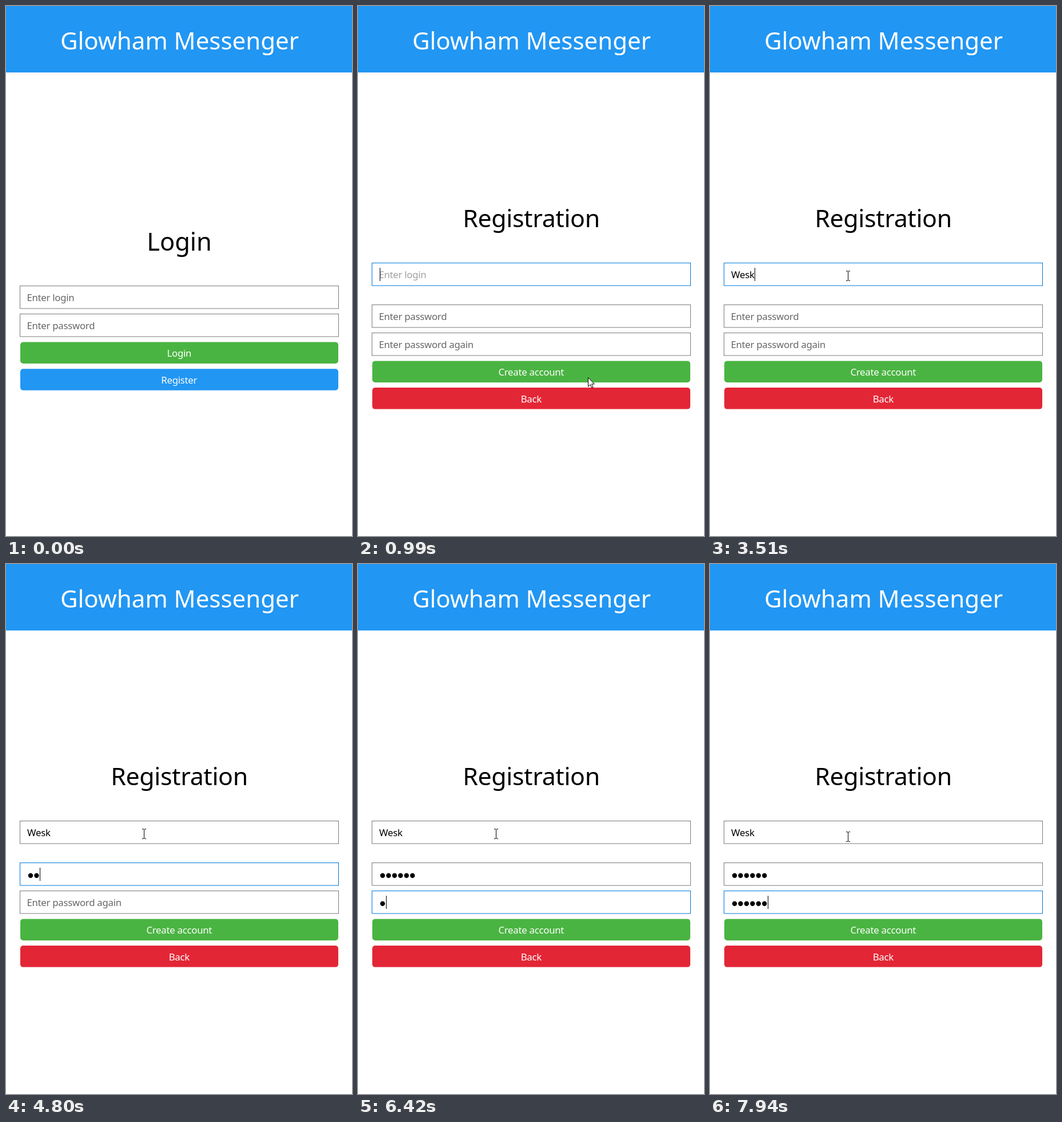
An HTML page for the animation above (8000 ms loop, 605 by 925 pixels).

```html
<!DOCTYPE html>
<html lang="en">
<head>
<meta charset="utf-8">
<title>Registration form</title>
<style>
html, body { margin: 0; width: 100%; height: 100%; overflow: hidden; background: #fff; }
svg { display: block; width: 605px; height: 925px; font-family: "Noto Sans", "Open Sans", sans-serif; }
text { font-size: 16.8px; letter-spacing: -.27px; }
.title { font-size: 42px; letter-spacing: 0; fill: #fff; text-anchor: middle; }
.head { font-size: 43.4px; letter-spacing: 0; text-anchor: middle; }
.head.long { font-size: 42.8px; letter-spacing: -.35px; }
.field rect { fill: #fff; stroke: #7a7a7a; }
.field .hint { fill: #666; }
.field.focus rect { stroke: #0078d7; }
.field.focus .hint { fill: #a0a0a0; }
.button text { fill: #fff; text-anchor: middle; }
</style>
</head>
<body>
<svg viewBox="0 0 605 925">
  <rect width="605" height="116" fill="#2196f3"/>
  <text class="title" x="303.5" y="76">Glowham Messenger</text>
  <g id="login"><text class="head" x="303" y="427">Login</text></g>
  <g id="register"><text class="head long" x="303" y="386">Registration</text></g>
  <rect id="caret" width="1" height="23"/>
  <path id="arrow" d="M.5 .5V16.2L4.2 12.7L6.7 18.4L9.1 17.4L6.6 11.8H11.4Z" fill="#fff" stroke="#000"/>
  <path id="beam" d="M-3 -8.5H-1L.5 -7.5L2 -8.5H4M.5 -7.5V7.5M-3 8.5H-1L.5 7.5L2 8.5H4" fill="none" stroke="#000"/>
</svg>
<script>
const LOOP = 8000, STEP = 100;
const NAME = "Wesk";
const NAME_TIMES = [2600, 2900, 3510, 3510];
const PASS_TIMES = [4510, 4800, 5020, 5220, 5520, 5720];
const AGAIN_TIMES = [6420, 6620, 6840, 7040, 7240, 7440];
const GREEN = "#4ab442", BLUE = "#2196f3", RED = "#e32636";

const $ = id => document.getElementById(id);
const login = $("login"), register = $("register"), caret = $("caret"), arrow = $("arrow"), beam = $("beam");

function add(parent, tag, attrs, text = "") {
  const el = document.createElementNS("http://www.w3.org/2000/svg", tag);
  for (const key in attrs) el.setAttribute(key, attrs[key]);
  el.textContent = text;
  return parent.appendChild(el);
}

function field(page, y, hint) {
  const box = add(page, "g", { class: "field" });
  add(box, "rect", { x: 24.5, y: y + .5, width: 557, height: 39.5 });
  const label = add(box, "text", { x: 36.4, y: y + 27.4, class: "hint" }, hint);
  const value = add(box, "text", { x: 37, y: y + 27.4 });
  return { box, label, value, y, dots: [] };
}

function passField(page, y, hint) {
  const f = field(page, y, hint);
  for (let i = 0; i < 6; i++)
    f.dots.push(add(f.box, "circle", { cx: 43 + i * 10.45, cy: y + 22.8, r: 4.2 }));
  return f;
}

function button(page, y, fill, label) {
  const box = add(page, "g", { class: "button" });
  add(box, "rect", { x: 25, y, width: 556, height: 37.5, rx: 5, fill });
  add(box, "text", { x: 302.8, y: y + 25.4 }, label);
}

field(login, 488, "Enter login");
field(login, 537, "Enter password");
button(login, 586.5, GREEN, "Login");
button(login, 633.3, BLUE, "Register");

const user = field(register, 448, "Enter login");
const pass = passField(register, 521, "Enter password");
const again = passField(register, 570, "Enter password again");
button(register, 619.4, GREEN, "Create account");
button(register, 666.1, RED, "Back");

const show = (el, on) => el.setAttribute("visibility", on ? "visible" : "hidden");
const typed = (times, t) => times.filter(at => t >= at).length;
const place = (el, x, y) => el.setAttribute("transform", `translate(${Math.round(x)} ${Math.round(y)})`);
const mix = (a, b, p) => a + (b - a) * p;

// Pointer progress, held for STEP ms at a time
function progress(t, start, count) {
  const k = Math.floor((t - start) / STEP);
  return Math.max(0, Math.min(1, k / count));
}

function pointer(t) {
  if (t < 1190) {
    const p = 1 - (1 - progress(t, 290, 6)) ** 2;
    return [mix(438, 402, p), mix(852, 648, p)];
  }
  if (t < 7840) {
    const p = progress(t, 1090, 5);
    const e = p * p * (3 - 2 * p);
    return [mix(402, 241, e), mix(648, 471, e)];
  }
  return [241, t < 7940 ? 473 : 476];
}

function setDots(f, n) {
  f.dots.forEach((dot, i) => show(dot, i < n));
  show(f.label, n === 0);
}

function draw(t) {
  const registering = t >= 990;
  login.style.display = registering ? "none" : "";
  register.style.display = registering ? "" : "none";

  const [x, y] = pointer(t);
  const overField = registering && [user, pass, again].some(f => y >= f.y && y <= f.y + 40);
  show(arrow, t >= 290 && !overField);
  show(beam, overField);
  place(arrow, x, y);
  place(beam, x, y);

  const active = t < 3710 ? user : t < 6020 ? pass : again;
  for (const f of [user, pass, again]) f.box.classList.toggle("focus", f === active);

  const letters = typed(NAME_TIMES, t);
  user.value.textContent = NAME.slice(0, letters);
  show(user.label, letters === 0);
  const counts = { pass: typed(PASS_TIMES, t), again: typed(AGAIN_TIMES, t) };
  setDots(pass, counts.pass);
  setDots(again, counts.again);

  let caretX = 38;
  if (active === user) {
    if (registering && letters) caretX = 37 + user.value.getComputedTextLength();
  } else {
    const n = active === pass ? counts.pass : counts.again;
    if (n) caretX = 38 + n * 10.5;
  }
  const blinkedOff = (t >= 1490 && t < 1790) || (t >= 4210 && t < 4510);
  caret.setAttribute("x", Math.round(caretX));
  caret.setAttribute("y", active.y + 9);
  show(caret, registering && !blinkedOff);
}

const begin = performance.now();
function tick() {
  draw((performance.now() - begin) % LOOP);
  requestAnimationFrame(tick);
}
tick();
</script>
</body>
</html>
```
